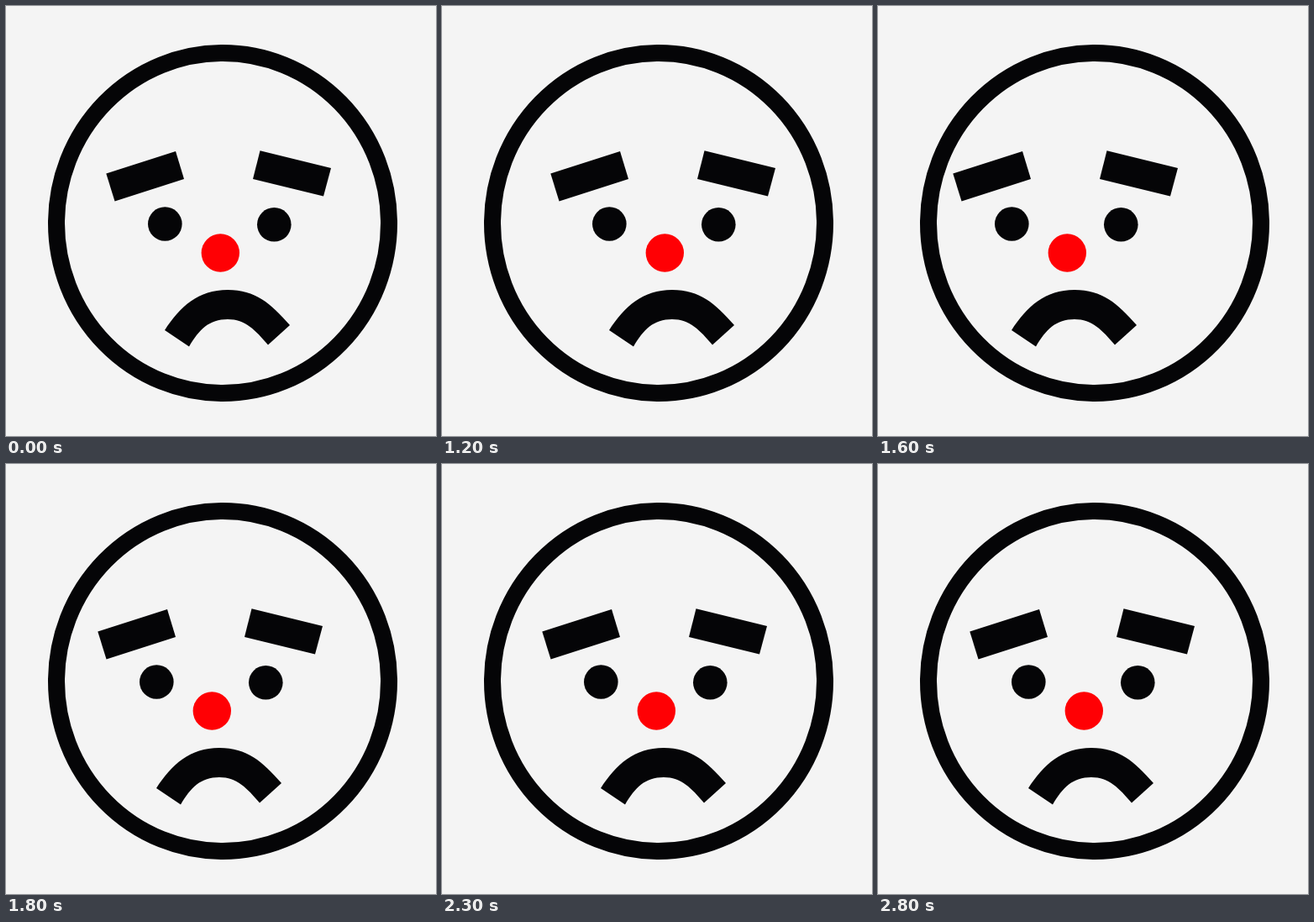
An HTML page that plays this animation: 512x512 px, repeating every 2900 ms.

```html
<!DOCTYPE html>
<html lang="en">
<head>
<meta charset="utf-8">
<title>Sad face shaking its head</title>
<style>
  html, body { margin: 0; height: 100%; overflow: hidden; background: #f4f4f4; }
  svg { display: block; width: 100%; height: 100%; }
  .ink { fill: #050507; }
  .outline { fill: none; stroke: #050507; stroke-width: 20; }
  .nose { fill: #ff0004; }

  /* Rest for 1 s, then swing in 10 px jumps every 100 ms. */
  .features { animation: shake 2900ms infinite; }
  @keyframes shake {
    0%        { transform: translateX(0);     animation-timing-function: step-end; }
    34.48275% { transform: translateX(10px);  animation-timing-function: step-end; }
    37.93103% { transform: translateX(20px);  animation-timing-function: steps(5, end); }
    55.17241% { transform: translateX(-30px); animation-timing-function: steps(5, end); }
    72.41379% { transform: translateX(20px);  animation-timing-function: steps(5, end); }
    89.65517% { transform: translateX(-30px); animation-timing-function: steps(3, end); }
    100%      { transform: translateX(0); }
  }
</style>
</head>
<body>
<svg viewBox="0 0 512 512">
  <ellipse class="outline" cx="258" cy="258.5" rx="198" ry="202.5"/>
  <g class="features ink">
    <path d="M119.3 199.5 202 173 212 206 129.5 232.5Z"/>
    <path d="M302.5 172.3 387 193 378 226.5 294 206Z"/>
    <circle cx="189.3" cy="259.5" r="20.3"/>
    <circle cx="319.3" cy="260.3" r="20.3"/>
    <circle class="nose" cx="255.3" cy="294" r="22.7"/>
    <path d="M189 386C207 358 229 338 264 338C297 338 315 354 338 380L312 403.5C297 386 285 373 264 373C242 373 230 385 218 405.5Z"/>
  </g>
</svg>
</body>
</html>
```
